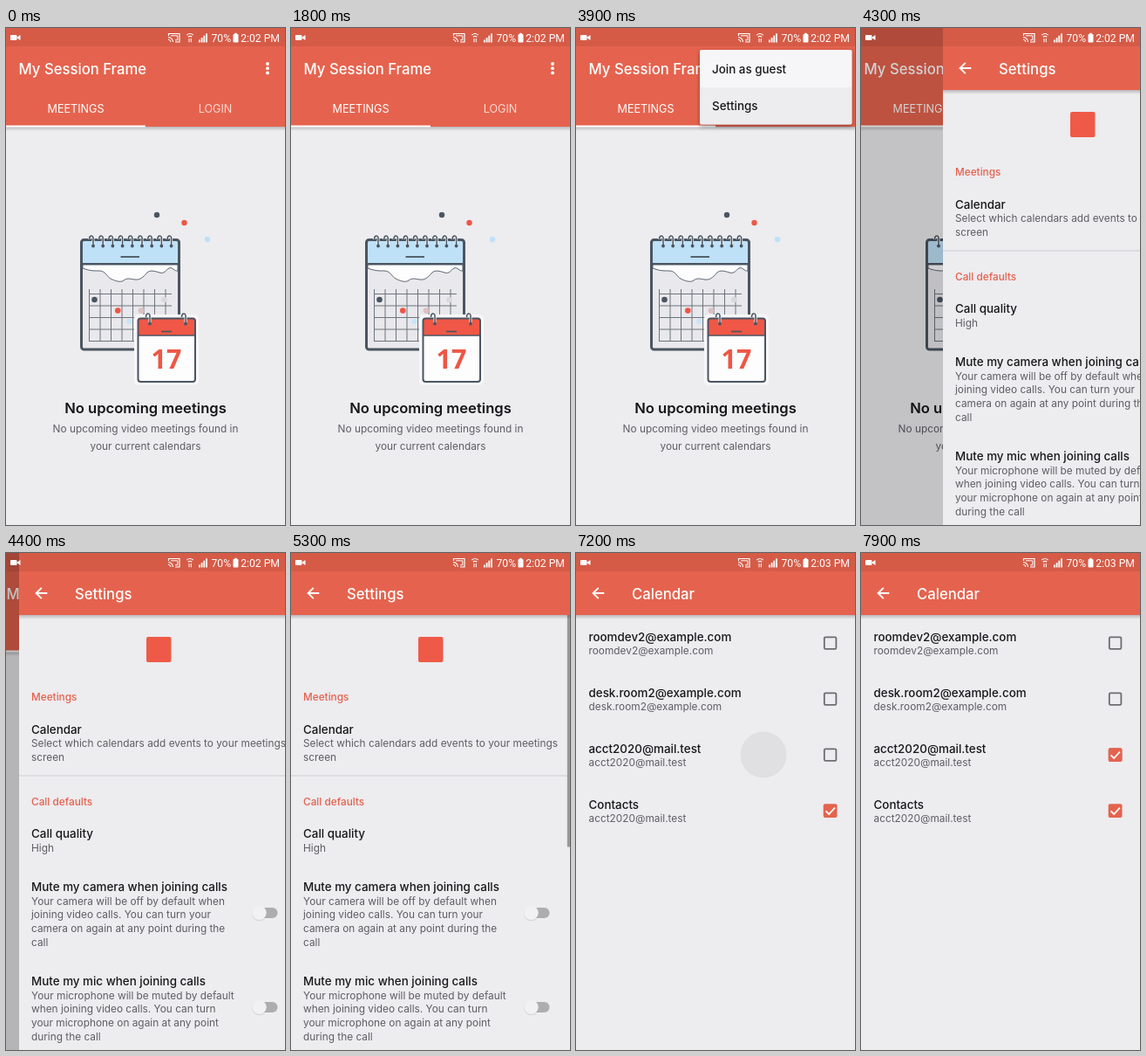
An HTML page for the animation above (8000 ms loop, 320 by 569 pixels).

```html
<!DOCTYPE html>
<html lang="en">
<head>
<meta charset="utf-8">
<title>Meeting app settings</title>
<style>
html, body { margin: 0; width: 100%; height: 100%; overflow: hidden; background: #edecef; }
svg { display: block; width: 100%; height: 100%; font-family: Inter, sans-serif; }
.bar { font-size: 16.7px; font-weight: 500; fill: #fff; }
.tab { font-size: 12.6px; fill: #fff; text-anchor: middle; }
.item { font-size: 13.4px; font-weight: 500; fill: #18171a; }
.sub { font-size: 11.85px; fill: #5f5e63; }
.head { font-size: 11.8px; font-weight: 500; fill: #e5604c; }
.mid { text-anchor: middle; }
.status { font: 12.2px Roboto, sans-serif; fill: #fff; }
</style>
</head>
<body>
<svg id="stage" viewBox="0 0 320 569"></svg>
<script>
const RED = '#e5634e', DARK_RED = '#d55b47', INK = '#4a5561', BG = '#edecef', LOOP = 8000;

const text = (x, y, cls, s, extra = '') => `<text x="${x}" y="${y}" class="${cls}" ${extra}>${s}</text>`;
const rect = (x, y, w, h, fill, extra = '') =>
  `<rect x="${x}" y="${y}" width="${w}" height="${h}" fill="${fill}" ${extra}/>`;
const dot = (x, y, r, fill, extra = '') => `<circle cx="${x}" cy="${y}" r="${r}" fill="${fill}" ${extra}/>`;
const line = (d, stroke, w, extra = '') =>
  `<path d="${d}" fill="none" stroke="${stroke}" stroke-width="${w}" ${extra}/>`;
const lines = (x, y, step, rows) => rows.map((s, i) => text(x, y + i * step, 'sub', s)).join('');
const times = (n, f) => Array.from({ length: n }, (_, i) => f(i)).join('');
const header = h => rect(0, h, 320, 5, 'url(#shade)') + rect(0, 0, 320, h, RED) + rect(0, 0, 320, 21, DARK_RED);
const ring = (x, y) =>
  line(`M${x + 2} ${y + 11}V${y + 2}q-.5 -2.5 -2.5 -2q-2 .5 -2 4`, '#f4f4f6', 3) +
  line(`M${x + 2} ${y + 11}V${y + 2}q-.5 -2.5 -2.5 -2q-2 .5 -2 4`, INK, 1.5) +
  dot(x + 2, y + 11.5, 1.9, INK);
const arrow = line('M32.3 46H19.5M25.8 39.8l-6.2 6.2 6.2 6.2', '#fff', 1.9);

function bigCalendar() {
  return rect(86.5, 242.5, 112, 125.5, '#e9e8ec', 'rx="3"') +
    rect(87, 243, 111, 27, '#bee1f8') +
    `<path d="M88 271H197V278C193 279 191 273 187 275S182 282 176 280S165 277 162 280S155 289 148 288
      S139 286 135 289S124 289 120 287S114 278 107 278S96 278 88 275Z" fill="#fdfdfe" stroke="${INK}" stroke-width=".9"/>` +
    line('M87 270H198', INK, 2.2) + line('M131.5 262H153', INK, 1.8) +
    times(8, i => line(`M${95.5 + i * 12.5} 299V359`, '#6c747d', 1)) +
    times(5, i => line(`M95 ${304.5 + i * 13.5}H190`, '#6c747d', 1)) +
    rect(86.5, 242.5, 112, 125.5, 'none', `rx="3" stroke="${INK}" stroke-width="3"`) +
    times(9, i => ring(98 + i * 11.2, 238)) +
    dot(101.5, 311, 3.3, INK) + dot(128.3, 323.6, 3.3, '#ee5646') +
    dot(141.5, 336, 3.3, '#c9e5f7') + dot(155, 323.6, 3.3, '#dcbfc1') + dot(181.5, 311, 3.3, '#d9d8dc');
}

function smallCalendar() {
  return rect(147, 328, 74, 81, '#f7f6f8', 'rx="5"') +
    rect(151.5, 332.5, 65.5, 72.5, '#fdfdfe', 'rx="3"') +
    rect(152, 333, 64.5, 19, '#f05746') +
    line('M152 352H217', INK, 1.7) + line('M178 347.5H190', INK, 1.7) +
    rect(151.5, 332.5, 65.5, 72.5, 'none', `rx="3" stroke="${INK}" stroke-width="2"`) +
    ring(163, 327) + ring(204, 327) +
    text(184, 389.5, 'mid', '17', 'font-family="Open Sans, sans-serif" font-weight="700" font-size="30.5" fill="#ee5646"');
}

function mainPage() {
  return rect(0, 0, 320, 569, BG) + header(113) +
    text(14.5, 52.5, 'bar', 'My Session Frame') + times(3, i => dot(300, 41 + i * 5.2, 1.9, '#fff')) +
    text(80, 97, 'tab', 'MEETINGS') + text(240, 97, 'tab', 'LOGIN', 'opacity=".75"') +
    rect(0, 111.5, 160, 2, '#fff') +
    dot(173, 214, 3.2, INK) + dot(204.5, 223, 3.2, '#ee5646') + dot(231, 242, 3.2, '#bee1f8') +
    bigCalendar() + smallCalendar() +
    text(160, 441, 'mid', 'No upcoming meetings', 'font-size="16.6" font-weight="600" fill="#161518"') +
    text(160, 462.5, 'sub mid', 'No upcoming video meetings found in') +
    text(160, 483, 'sub mid', 'your current calendars');
}

const toggle = y => rect(271, y - 6, 25.5, 12, '#adacaf', 'rx="6"') +
  dot(275.5, y + .7, 8.6, '#000', 'opacity=".1"') + dot(275.5, y, 8.3, '#f1f1f1');

function settingsList() {
  return rect(0, 71, 320, 498, BG) +
    '<g clip-path="url(#calRow)"><circle id="calRipple" cx="120" cy="218" fill="#000"/></g>' +
    rect(146, 96, 28.5, 29, '#ee5a47', 'rx="2"') +
    text(14, 168.5, 'head', 'Meetings') + text(14, 206.5, 'item', 'Calendar') +
    lines(14, 222, 15.8, ['Select which calendars add events to your meetings', 'screen']) +
    rect(0, 254.5, 320, 1, '#cfced2') +
    text(14, 288.5, 'head', 'Call defaults') + text(14, 326, 'item', 'Call quality') + text(14, 342, 'sub', 'High') +
    text(14, 386.5, 'item', 'Mute my camera when joining calls') +
    lines(14, 402.5, 15.7, ['Your camera will be off by default when', 'joining video calls. You can turn your',
      'camera on again at any point during the', 'call']) + toggle(412) +
    text(14, 494.5, 'item', 'Mute my mic when joining calls') +
    lines(14, 510.5, 15.7, ['Your microphone will be muted by default', 'when joining video calls. You can turn',
      'your microphone on again at any point', 'during the call']) + toggle(520);
}

const checked = (y, id = '') => `<g ${id}>` + rect(283.7, y - 7.8, 15.8, 15.8, RED, 'rx="2"') +
  line(`M286.5 ${y + .4}l3.6 3.6 6.8 -7.4`, '#fff', 1.8) + '</g>';
const box = y => rect(284.8, y - 6.7, 13.6, 13.6, 'none', 'rx="1.3" stroke="#6d6c71" stroke-width="1.8"');

function accountList() {
  const rows = [
    ['roomdev2@example.com', 'roomdev2@example.com'],
    ['desk.room2@example.com', 'desk.room2@example.com'],
    ['acct2020@mail.test', 'acct2020@mail.test'],
    ['Contacts', 'acct2020@mail.test']
  ];
  return '<g clip-path="url(#boxRow)"><circle id="boxRipple" cx="215" cy="231" fill="#000"/></g>' +
    rows.map(([a, b], i) => text(14.5, 101 + i * 64, 'item', a) + text(14.5, 116 + i * 64, 'sub', b) +
      (i < 3 ? box(103 + i * 64) : '')).join('') +
    checked(231, 'id="tick"') + checked(295);
}

function menu() {
  return rect(142, 25, 174.5, 85.5, '#f6f5f7', 'rx="2" filter="url(#drop)"') +
    '<g clip-path="url(#menuRow)"><circle id="menuRipple" cx="215" cy="90" fill="#000"/></g>' +
    text(156, 51.5, 'item', 'Join as guest') + text(156, 94, 'item', 'Settings');
}

function statusBar() {
  return rect(5, 8, 7.5, 6, '#fff', 'rx="1"') + '<path d="M12 11l4.5-3v6z" fill="#fff"/>' +
    line('M186.5 9V6.5H199V16H194', '#fff', 1.2) + line('M189 8.8H196.8V13.8H194', '#fff', 1) +
    line('M186 10.5q5 .5 5.5 5.5M186 13q2.5 .5 3 3', '#fff', 1.1) +
    line('M207.3 8q3.7-3 7.4 0M208.8 10.3q2.2-1.800 4.400 0', '#fff', 1.1) +
    line('M210 12v4.3M212.3 12v4.3', '#fff', 1) +
    times(4, i => rect(221 + i * 2.7, 13.5 - i * 2.4, 1.8, 3 + i * 2.4, '#fff')) +
    text(235.5, 15.5, 'status', '70%') +
    rect(260.5, 7, 6, 9.5, '#fff', 'rx="1"') + rect(262.2, 5.8, 2.6, 2, '#fff') +
    text(314, 15.5, 'status', '2:02 PM', 'id="clock" text-anchor="end"');
}

const clip = (id, x, y, w, h) => `<clipPath id="${id}">${rect(x, y, w, h, '#000')}</clipPath>`;

document.getElementById('stage').innerHTML = `<defs>
  <linearGradient id="shade" x2="0" y2="1"><stop stop-color="#000" stop-opacity=".22"/><stop offset="1" stop-opacity="0"/></linearGradient>
  <filter id="drop" x="-10%" y="-10%" width="120%" height="125%"><feDropShadow dx="0" dy="2" stdDeviation="2.5" flood-opacity=".38"/></filter>
  ${clip('calRow', 0, 185, 320, 69)}${clip('boxRow', 0, 199, 320, 64)}${clip('menuRow', 142, 68, 174.5, 42.5)}${clip('body', 0, 71, 320, 498)}
  </defs>
  <g id="main">${mainPage()}<circle id="dotsRipple" cx="300" cy="46" fill="#fff"/></g>
  <rect id="dim" width="320" height="569"/>
  <g id="menu">${menu()}</g>
  <g id="settings">${rect(0, 0, 320, 569, BG)}
    <g clip-path="url(#body)"><g id="prefs">${settingsList()}</g><g id="accounts">${accountList()}</g></g>
    ${rect(316.8, 71, 3.2, 265.5, '#98979a', 'id="scrollbar"')}
    ${header(71)}${arrow}${text(64, 52.5, 'bar', 'Settings', 'id="title"')}
  </g>${statusBar()}`;

const el = {};
document.querySelectorAll('svg [id]').forEach(n => el[n.id] = n);

const ramp = (t, from, to) => Math.min(1, Math.max(0, (t - from) / (to - from)));
const easeOut = (k, power) => 1 - Math.pow(1 - k, power);
const show = (n, a) => { n.setAttribute('opacity', a); n.style.display = a > 0 ? '' : 'none'; };
const shift = (n, x) => n.setAttribute('transform', `translate(${x} 0)`);

// Grows from start to grown, fades from release to end.
function ripple(n, t, [start, grown, release, end], radius, alpha) {
  n.setAttribute('r', radius * easeOut(ramp(t, start, grown), 2));
  show(n, alpha * ramp(t, start - 60, start + 60) * (1 - ramp(t, release, end)));
}

function draw(t) {
  ripple(el.dotsRipple, t, [1980, 2200, 2250, 2520], 18, .2);
  ripple(el.menuRipple, t, [3280, 3800, 3900, 4150], 125, .035);
  ripple(el.calRipple, t, [5480, 5680, 5680, 5780], 230, .08);
  ripple(el.boxRipple, t, [7180, 7550, 7550, 7900], 240, .08);

  const open = easeOut(ramp(t, 2130, 2430), 3);
  show(el.menu, open * (1 - ramp(t, 4130, 4260)));
  const s = .75 + .25 * open;
  el.menu.setAttribute('transform', `translate(${316 * (1 - s)} ${25 * (1 - s)}) scale(${s})`);

  const slide = easeOut(ramp(t, 4200, 4550), 3.6);
  shift(el.main, Math.round(-15 * slide));
  show(el.dim, .25 * slide);
  shift(el.settings, Math.round(320 * (1 - slide)));
  show(el.settings, slide > 0 ? 1 : 0);

  const swap = easeOut(ramp(t, 5580, 5880), 3.15);
  shift(el.prefs, -160 * swap);
  show(el.prefs, 1 - swap * swap);
  shift(el.accounts, 160 * (1 - swap));
  show(el.accounts, swap);
  show(el.scrollbar, 1 - ramp(t, 5500, 5700));
  show(el.tick, ramp(t, 7380, 7520));

  el.title.textContent = t < 5580 ? 'Settings' : 'Calendar';
  el.clock.textContent = t < 5580 ? '2:02 PM' : '2:03 PM';
}

function tick() {
  draw(performance.now() % LOOP);
  requestAnimationFrame(tick);
}
tick();
</script>
</body>
</html>
```
